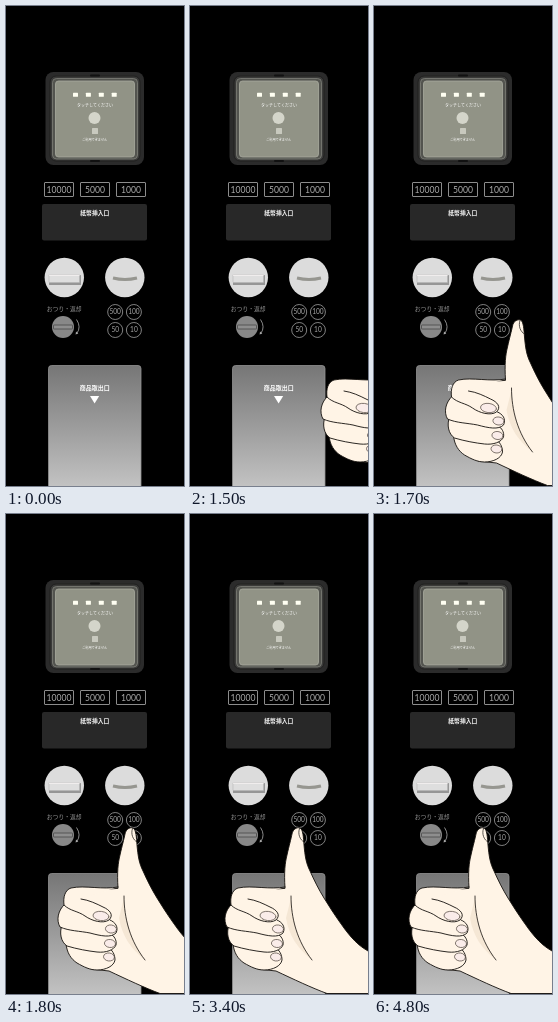
Animation of 178x480 px, one loop 5 s. Source, as an HTML page with a canvas:

```html
<!DOCTYPE html>
<html lang="ja">
<head>
<meta charset="utf-8">
<title>Vending machine</title>
<style>
html, body { margin: 0; width: 100%; height: 100%; overflow: hidden; background: #000; }
canvas { display: block; width: 178px; height: 480px; }
</style>
</head>
<body>
<canvas id="stage"></canvas>
<script>
const W = 178, H = 480, LOOP = 5000;
const canvas = document.getElementById('stage');
const dpr = window.devicePixelRatio || 1;
canvas.width = Math.round(W * dpr);
canvas.height = Math.round(H * dpr);
const ctx = canvas.getContext('2d');
const JP = '"Noto Sans CJK JP", "Noto Sans CJK", sans-serif';
const LATIN = 'Lato, "Open Sans", sans-serif';

function paint(path, fill, stroke, width = 1) {
  if (fill) { ctx.fillStyle = fill; ctx.fill(path); }
  if (stroke) { ctx.strokeStyle = stroke; ctx.lineWidth = width; ctx.stroke(path); }
}

function box(x, y, w, h, r, fill, stroke, width) {
  const p = new Path2D();
  p.roundRect(x, y, w, h, r);
  paint(p, fill, stroke, width);
}

function oval(x, y, rx, ry, turn, fill, stroke, width) {
  const p = new Path2D();
  p.ellipse(x, y, rx, ry, turn, 0, Math.PI * 2);
  paint(p, fill, stroke, width);
}

function disc(x, y, r, fill, stroke, width) {
  oval(x, y, r, r, 0, fill, stroke, width);
}

function label(str, x, y, size, color, family = JP, weight = 400) {
  ctx.font = `${weight} ${size}px ${family}`;
  ctx.textAlign = 'center';
  ctx.textBaseline = 'alphabetic';
  ctx.fillStyle = color;
  ctx.fillText(str, x, y);
}

function fade(y0, y1, ...colors) {
  const g = ctx.createLinearGradient(0, y0, 0, y1);
  colors.forEach((c, i) => g.addColorStop(i / (colors.length - 1), c));
  return g;
}

function drawReader() {
  box(39.5, 66, 98.5, 93, 8, '#2b2b2b');
  box(44, 70, 90, 85, 6, '#3a3a39', '#20201f');
  box(46.5, 72.5, 85, 80.5, 4, '#53544f', '#7f8079', 0.8);
  box(49.5, 75, 79, 76, 3, '#919386', '#a9aa9f', 0.8);
  box(84, 68.5, 10, 2, 1, '#111');
  box(84, 154, 10, 2, 1, '#111');
  for (let i = 0; i < 4; i++) box(67 + i * 12.9, 86.7, 5, 4, 0.5, '#fffff2');
  label('タッチしてください', 89, 101, 4, '#fff', JP, 500);
  disc(88.5, 112, 6, '#d4d5ca');
  box(86, 122, 6, 6, 0.5, '#c8c9be');
  label('ご利用できません', 88.7, 134.6, 3.15, '#fff', JP, 500);
}

function drawBills() {
  ['10000', '5000', '1000'].forEach((value, i) => {
    const x = 38 + i * 36;
    box(x + 0.5, 176.5, 29, 14, 0.5, null, '#8c8c8c');
    label(value, x + 15, 187, 8.6, '#acacac', LATIN);
  });
  box(36, 198, 105, 36.5, 2, '#282828');
  label('紙幣挿入口', 88.8, 208.8, 5.8, '#f4f4f4', JP, 700);
}

function drawCoins() {
  ctx.lineCap = 'butt';
  disc(58.3, 271.5, 19.7, '#dcdcdc');
  box(43, 269, 32, 10, 0.5, '#969696');
  box(43, 268.5, 30.5, 8, 0.5, '#dedede', '#b5b5b5', 0.6);
  paint(new Path2D('M43 269.2H73.5'), null, '#f8f4f4', 1);

  disc(118.8, 271.5, 19.7, '#dcdcdc');
  paint(new Path2D('M107 272Q119 275 131 272'), null, '#969690', 3);

  label('おつり・返却', 58.2, 304.6, 5.8, '#939393');
  disc(57, 321, 11, '#888');
  box(47.5, 319, 19, 4, 0.5, '#8e8e8e', '#484848', 0.8);
  paint(new Path2D('M70.5 313.5Q75.5 321 70.8 327.5'), null, '#999', 0.9);
  paint(new Path2D('M69.6 328.5L70 325.5L72.3 327.4Z'), '#aaa');

  ['500', '100', '50', '10'].forEach((value, i) => {
    const x = 109.2 + (i % 2) * 18.7, y = 306 + (i >> 1) * 18;
    disc(x, y, 7.5, null, '#808080', 1);
    label(value, x, y + 2.4, 6.6, '#a8a8a8', LATIN);
  });
}

function drawOutlet() {
  box(42.5, 359.5, 92.5, 130, 3, fade(359, 480, '#767676', '#9b9b9b', '#c2c2c2'), '#929292', 0.8);
  label('商品取出口', 88.8, 384.3, 6, '#fff', JP, 700);
  paint(new Path2D('M84 390H93.2L88.6 397.5Z'), '#fff');
}

const SKIN = '#fff4e6', SHADE = '#f5e7d5', INK = '#15110e';
const palm = new Path2D(
  'M95 374C94 358 95 349 97 341C99 332 101 325 102 320C103 315 107 313 110 314' +
  'C113 315 113.5 324 114 331C115 342 116 349 120 357' +
  'C124 366 129 376 134 384C139 392 144 400 149 407C156 417 165 430 178 437' +
  'L330 520L330 479.5L137 479.5C122 474 103 465 86 457' +
  'L68 455L50 440L40 405L44 378Z');
const shadow = new Path2D('M101 384C102 405 107 426 122 446C108 435 99 422 96 404Z');
const crease = new Path2D('M101 382C101 404 107 427 122 446');
const thumbNail = new Path2D('M109.5 314.5C107.5 320 110 326 114 328');
const fingers = [
  'M43 430C44 439 48 445 54 449C61 453 67 456 74 456C83 456 91 452 92 446C92 440 89 436 86 434',
  'M39 411C36 419 38 428 44 432C54 435 65 437 74 438C83 439 91 436 93 431C94 426 91 422 88 420',
  'M42 390C35 396 33 406 37 413C46 417 57 417 67 419C78 422 88 424 93 419C96 413 92 408 87 406',
  'M95 373C80 376 62 371 48 374C42 376 40 383 41 391C47 397 55 397 62 402' +
  'C69 407 80 410 86 406C91 401 87 396 80 393C74 390 66 386 58 385'
].map(d => new Path2D(d));
const nails = [[86, 443, 5.5, 4], [87, 429.5, 5.6, 4], [88, 415, 5.6, 4], [78, 402, 8, 4.6]];

function drawHand(shift) {
  ctx.save();
  ctx.translate(shift, 0);
  ctx.lineJoin = ctx.lineCap = 'round';
  // The forearm continues beyond the right edge of the stage.
  paint(palm, SKIN, INK, 0.9);
  paint(shadow, SHADE);
  paint(crease, null, INK, 0.8);
  paint(thumbNail, null, INK, 0.7);
  fingers.forEach((finger, i) => {
    paint(finger, SKIN, INK, 0.9);
    const [x, y, rx, ry] = nails[i];
    oval(x, y, rx, ry, 0.12, '#faece9', '#494039', 0.7);
  });
  ctx.restore();
}

// The hand slides in on 100 ms steps and then rests.
const steps = [124, 96, 68, 36.5, 17, 0];

function render(t) {
  ctx.setTransform(dpr, 0, 0, dpr, 0, 0);
  ctx.fillStyle = '#000';
  ctx.fillRect(0, 0, W, H);
  drawReader();
  drawBills();
  drawCoins();
  drawOutlet();
  if (t >= 1400) {
    const i = Math.min(steps.length - 1, Math.floor((t - 1400) / 100));
    drawHand(steps[i]);
  }
}

const start = performance.now();
function tick() {
  render((performance.now() - start) % LOOP);
  requestAnimationFrame(tick);
}
tick();
</script>
</body>
</html>
```
